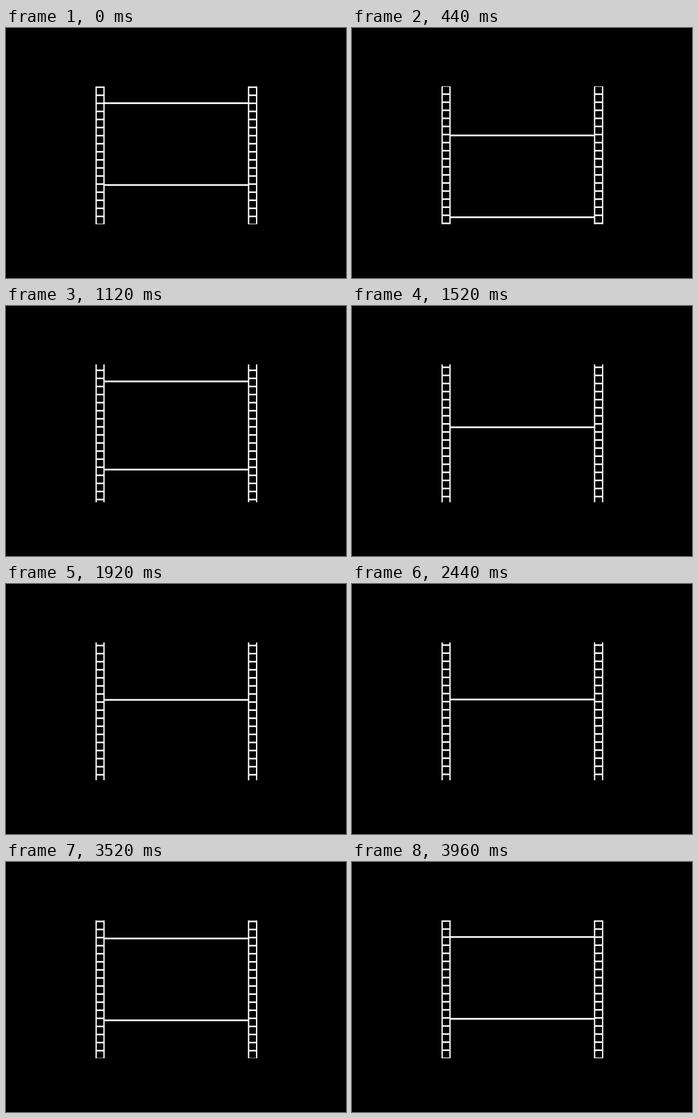
Recreate the animation shown at these times as an HTML page with a canvas. Size 563 by 414 pixels, loop 4000 ms.

```html
<!DOCTYPE html>
<html lang="en">
<head>
<meta charset="utf-8">
<title>Film strip</title>
<style>
  html, body { margin: 0; width: 100%; height: 100%; overflow: hidden; background: #000; }
  canvas { display: block; }
</style>
</head>
<body>
<canvas id="stage" width="563" height="414"></canvas>
<script>
const ctx = document.getElementById('stage').getContext('2d');
const LOOP = 4000, STEP = 40;
const TURN = 2210, END = 3980, TRAVEL = 796;
const TOP = 96.5, BOTTOM = 325;
const RAILS = [149.3, 162.3, 401.7, 415];
const RUNG_START = 98, RUNG_GAP = 13.375;
const DIVIDERS = [124.5, 260, 395.5, 531, 677, 812.5, 950.4, 1086];

function ease(x) {
  x = Math.min(1, Math.max(0, x));
  return x * x * (3 - 2 * x);
}

// The strip winds up slowly, then returns a little faster.
function travelAt(t) {
  return TRAVEL * (t < TURN ? ease(t / TURN) : ease((END - t) / (END - TURN)));
}

function bar(x1, x2, y, thickness) {
  ctx.fillRect(x1, y - thickness / 2, x2 - x1, thickness);
}

function draw(t) {
  const travel = travelAt(t);
  const [a, b, c, d] = RAILS;
  ctx.fillStyle = '#000';
  ctx.fillRect(0, 0, 563, 414);

  ctx.save();
  ctx.beginPath();
  ctx.rect(0, TOP, 563, BOTTOM - TOP);
  ctx.clip();
  ctx.fillStyle = '#fff';
  for (const x of RAILS) ctx.fillRect(x - 1.1, TOP, 2.2, BOTTOM - TOP);

  const firstRung = RUNG_START - travel % RUNG_GAP - RUNG_GAP;
  for (let y = firstRung; y < BOTTOM + RUNG_GAP; y += RUNG_GAP) {
    bar(a, b, y, 2.6);
    bar(c, d, y, 2.6);
  }
  for (const y of DIVIDERS) bar(b, c, y - travel, 2.8);
  ctx.restore();
}

function tick() {
  const t = performance.now() % LOOP;
  draw(Math.floor(t / STEP) * STEP);
  requestAnimationFrame(tick);
}
tick();
</script>
</body>
</html>
```
